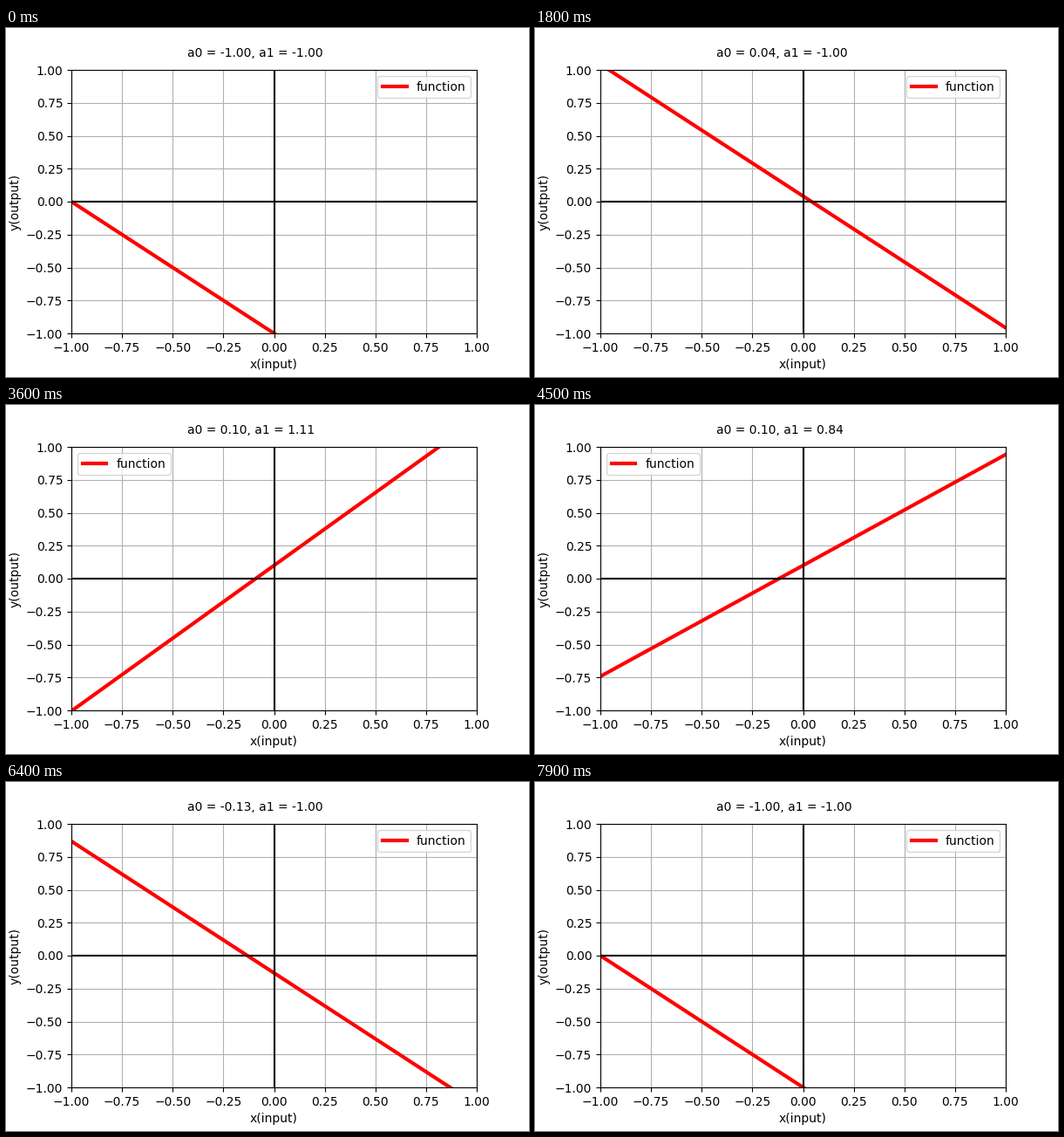
Animation, 600 px wide and 400 px high, one loop 8000 ms. Source, as a matplotlib script:

```python
import numpy as np
import matplotlib.pyplot as plt
from matplotlib.animation import FuncAnimation

plt.rcParams["font.family"] = "DejaVu Sans"

STEPS = 20  # frames per sweep
LOW, A0_HIGH, A1_HIGH = -1.0, 0.1, 1.5

a0_rise = np.linspace(LOW, A0_HIGH, STEPS)
a1_rise = np.linspace(LOW, A1_HIGH, STEPS)
a0_hold = np.full(2 * STEPS, A0_HIGH)
a1_hold = np.full(STEPS, LOW)

# raise the intercept, swing the slope up and back, lower the intercept
a0_values = np.concatenate([a0_rise, a0_hold, a0_rise[::-1]])
a1_values = np.concatenate([a1_hold, a1_rise, a1_rise[::-1], a1_hold])

fig, ax = plt.subplots(figsize=(6, 4), dpi=100)
fig.subplots_adjust(left=0.125, right=0.9, bottom=0.125, top=0.88)

x = np.linspace(-1, 1, 50)
line, = ax.plot(x, x, color="red", linewidth=3, label="function")
ax.axhline(0, color="black")
ax.axvline(0, color="black")
caption = ax.text(-0.43, 1.1, "")

ax.set_xlim(-1, 1)
ax.set_ylim(-1, 1)
ax.set_xlabel("x(input)")
ax.set_ylabel("y(output)")
ax.grid(True)
ax.legend(loc="best")


def update(i):
    a0, a1 = a0_values[i], a1_values[i]
    line.set_ydata(a0 + a1 * x)
    caption.set_text(f"a0 = {a0:.2f}, a1 = {a1:.2f}")
    return line, caption


anim = FuncAnimation(fig, update, frames=len(a0_values), interval=100,
                     repeat=True, repeat_delay=0)
plt.show()
```
